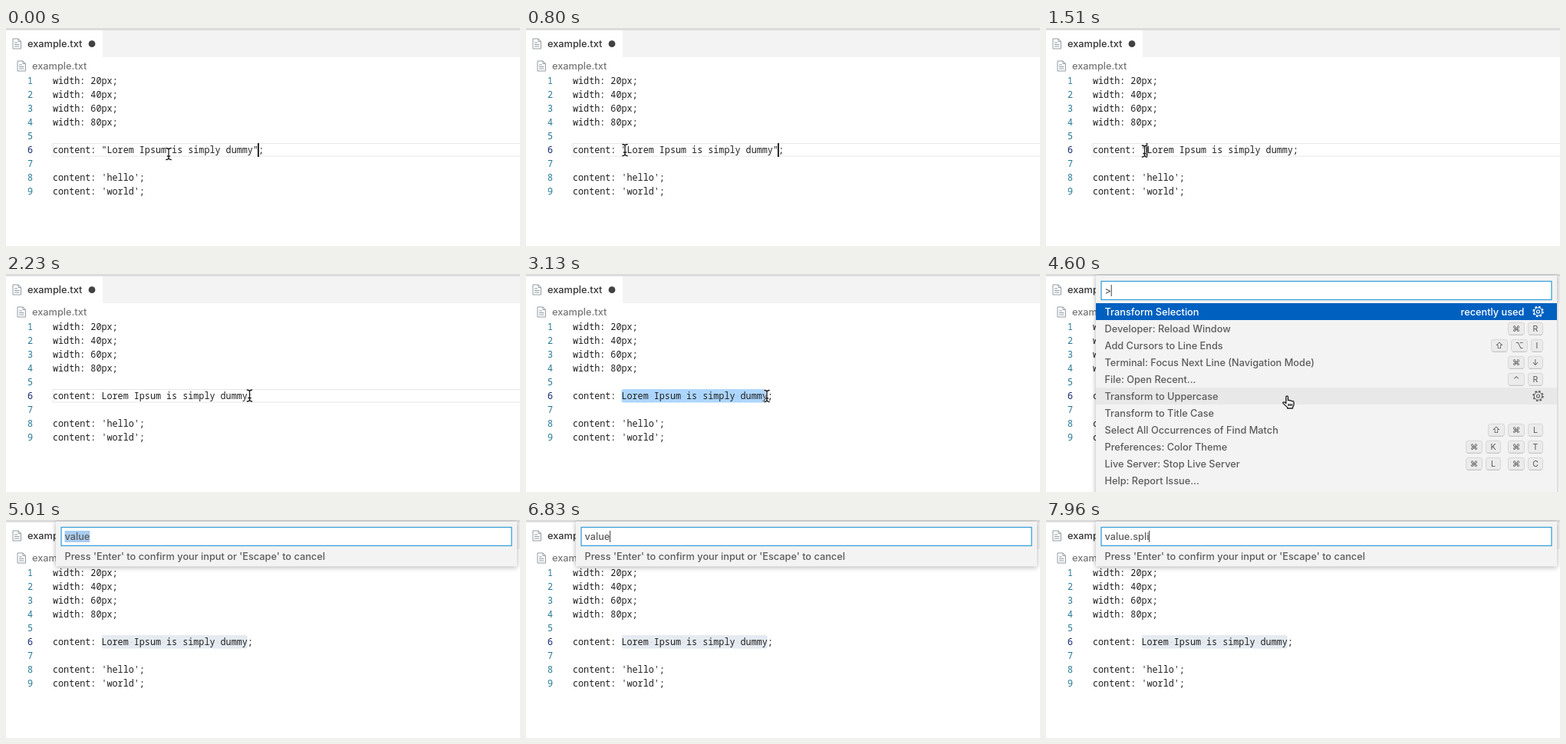
Recreate the animation shown at these times as an HTML page. Size 670 by 284 pixels, loop 8000 ms.

```html
<!DOCTYPE html>
<html lang="en">
<head>
<meta charset="utf-8">
<title>Editor</title>
<style>
  html, body { margin: 0; width: 100%; height: 100%; overflow: hidden; background: #fff; }
  svg { display: block; }
  text { white-space: pre; }
  .ui { font: 450 12.75px Inter, sans-serif; fill: #5c5c5c; }
  .code { font: 11.75px "Noto Sans Mono", monospace; fill: #1f1f1f; }
  .key { font: 10.5px Inter, "DejaVu Sans", sans-serif; fill: #555; text-anchor: middle; }
  .num { text-anchor: end; fill: #237893; }
  .panel { filter: drop-shadow(0 1px 3px rgba(0, 0, 0, .32)); }
</style>
</head>
<body>
<svg id="stage" width="670" height="284" viewBox="0 0 670 284"></svg>
<script>
const LOOP = 8000, CH = 7.05, LEFT = 61, ROW = 18;
const stage = document.getElementById('stage');

function el(parent, tag, attrs = {}, content) {
  const node = document.createElementNS('http://www.w3.org/2000/svg', tag);
  for (const k in attrs) node.setAttribute(k, attrs[k]);
  if (content !== undefined) node.textContent = content;
  return parent.appendChild(node);
}
const group = (parent, attrs) => el(parent, 'g', attrs);
const rect = (parent, x, y, width, height, fill, more) =>
  el(parent, 'rect', { x, y, width, height, fill, ...more });
const label = (parent, x, y, s, cls = 'ui', more) =>
  el(parent, 'text', { x, y, class: cls, ...more }, s);
const show = (node, on) => node.setAttribute('visibility', on ? 'visible' : 'hidden');
const col = n => LEFT + n * CH;

function fileIcon(x, y) {
  const g = group(stage, { transform: `translate(${x} ${y})`, fill: 'none', stroke: '#929ba2' });
  el(g, 'path', { d: 'M.5 .5H7.5L11 4V13.5H.5Z M7.5 .5V4H11' });
  el(g, 'path', { d: 'M2.5 5.5H6.5M2.5 8H9M2.5 10.5H9' });
}

function gear(parent, x, y, color) {
  const g = group(parent, { transform: `translate(${x} ${y})`, fill: 'none', stroke: color });
  el(g, 'circle', { r: 6.3, 'stroke-width': 1.8, 'stroke-dasharray': '2.47 2.47' });
  el(g, 'circle', { r: 5.2, 'stroke-width': 1 });
  el(g, 'circle', { r: 2, 'stroke-width': 1.1 });
}

// Editor chrome
rect(stage, 0, 0, 670, 3, '#dcdcdc');
rect(stage, 126, 3, 544, 35, '#f3f3f3');
fileIcon(8.5, 13.5);
label(stage, 28, 25.2, 'example.txt', 'ui', { style: 'fill:#333' });
el(stage, 'circle', { cx: 112, cy: 20.7, r: 4.4, fill: '#424242' });
fileIcon(14.5, 42.5);
label(stage, 34, 54, 'example.txt', 'ui', { style: 'fill:#777' });

// Code
const rowLine = group(stage);
rect(rowLine, LEFT, 150.5, 620, 16.5, 'none', { stroke: '#e6e6e6' });
const mark = rect(stage, col(9), 150, 27 * CH, 17.5, '#add6ff', { rx: 3 });
const dots = group(stage);
for (const n of [5, 11, 14, 21])
  el(dots, 'circle', { cx: col(9.5 + n), cy: 159.5, r: .7, fill: '#33333330' });

const lines = ['width: 20px;', 'width: 40px;', 'width: 60px;', 'width: 80px;', '', '', '',
  "content: 'hello';", "content: 'world';"];
const code = lines.map((s, i) => {
  const y = 73 + i * ROW;
  label(stage, 35, y, i + 1, 'code num', i === 5 ? { style: 'fill:#0b216f' } : {});
  return label(stage, LEFT, y, s, 'code');
});
const caret = rect(stage, 0, 150, 2, 18, '#222');

// Command list
const list = group(stage);
rect(list, 65, 2, 601, 290, '#f3f3f3', { class: 'panel' });
rect(list, 65, 38, 601, 22, '#0060c0');
rect(list, 65, 148, 601, 22, '#e8e8e8');
const commands = [
  ['Transform Selection'],
  ['Developer: Reload Window', '⌘R'],
  ['Add Cursors to Line Ends', '⇧⌥I'],
  ['Terminal: Focus Next Line (Navigation Mode)', '⌘↓'],
  ['File: Open Recent...', '⌃R'],
  ['Transform to Uppercase'],
  ['Transform to Title Case'],
  ['Select All Occurrences of Find Match', '⇧⌘L'],
  ['Preferences: Color Theme', '⌘K ⌘T'],
  ['Live Server: Stop Live Server', '⌘L ⌘C'],
  ['Help: Report Issue...'],
];

function keys(s, y) {
  let right = 648;
  for (const k of [...s].reverse()) {
    if (k === ' ') { right -= 5; continue; }
    const w = k === 'I' ? 16 : '⌘⇧⌥⌃'.includes(k) ? 22 : 20;
    rect(list, right - w + .5, y - 8, w - 1, 16, '#ebebeb', { rx: 3, stroke: '#d6d6d6' });
    rect(list, right - w + 2, y + 7.5, w - 4, 1, '#c2c2c2');
    label(list, right - w / 2, y + 3.8, k, 'key');
    right -= w + 4;
  }
}
commands.forEach(([name, combo], i) => {
  const y = 49.3 + i * 22;
  label(list, 76.5, y + 4.4, name, 'ui', i ? {} : { style: 'fill:#fff' });
  if (combo) keys(combo, y);
});
label(list, 623.5, 53.7, 'recently used', 'ui', { style: 'fill:#fff;text-anchor:end' });
gear(list, 641.5, 49, '#fff');
gear(list, 641.5, 159, '#616161');

// Prompt
const ask = group(stage);
rect(ask, 65, 2, 601, 58.5, '#f3f3f3', { class: 'panel' });
label(ask, 76.5, 52, "Press 'Enter' to confirm your input or 'Escape' to cancel");

// Shared input field
const field = group(stage);
rect(field, 72, 9.5, 587, 24, '#fff', { stroke: '#3aa0d8', 'stroke-width': 1.3 });
const picked = rect(field, 76.5, 14, 31, 15, '#a9cdf2');
const typed = label(field, 76.5, 26, '');
const bar = rect(field, 0, 14, 1, 15, '#444');

// Mouse pointers
const beam = group(stage, { fill: 'none', 'stroke-linecap': 'round' });
const beamPath = 'M-3.2 -7.5Q0 -7.5 0 -5V5Q0 7.5 -3.2 7.5M3.2 -7.5Q0 -7.5 0 -5V5Q0 7.5 3.2 7.5M-1.7 3H1.7';
el(beam, 'path', { d: beamPath, stroke: '#fff', 'stroke-width': 2.8, opacity: .75 });
el(beam, 'path', { d: beamPath, stroke: '#1c1c1c', 'stroke-width': 1.3 });
const hand = el(stage, 'path', {
  transform: 'translate(307.5 158) scale(1.08 1)', fill: '#fff', stroke: '#222', 'stroke-width': 1.3,
  'stroke-linejoin': 'round',
  d: 'M5 11V2.4Q5 .8 6.2 .8T7.4 2.4V6.8Q8.6 5.6 9.8 7.2Q11.2 6.2 12.2 7.8Q14.4 7 14.4 9.6V12' +
     'Q14.4 14 13 15.5V17H6.6V15.6L1.6 10.6Q.8 9 2.4 8.8Q3.4 8.8 5 10.6M8 11V14M10 11V14M12 11V14',
});

// [time, ...values], the last entry reached is in force
const TEXT = [
  [0, 'content: "Lorem Ipsum is simply dummy";'],
  [950, 'content: "Lorem Ipsum is simply dummy;'],
  [1590, 'content: Lorem Ipsum is simply dummy;'],
];
const CARET = [ // column, -1 when off
  [0, 38], [250, -1], [720, 38], [950, 37], [1190, 10], [1590, 9],
  [2090, -1], [2470, 36], [3130, -1],
];
const INPUT = [ // text, caret on
  [0, '>', 1], [4110, '>', 0], [4600, '>', 1], [5010, 'value', 0], [6830, 'value', 1],
  [7240, 'value', 0], [7310, 'value.', 1], [7560, 'value.s', 1], [7640, 'value.sp', 1],
  [7800, 'value.spl', 1], [7960, 'value.spli', 1],
];
const MOUSE = [ // x, y
  [0, 212, 164], [240, 198, 166], [560, 150, 162], [800, 129, 159], [1360, 129, 159],
  [1520, 128, 162], [1680, 129, 160], [1840, 129, 160], [2160, 317.5, 158.5],
  [2720, 317.5, 158.5], [2800, 314, 159],
];
const at = (table, t) => table.findLast(step => step[0] <= t);

function mouseAt(t) {
  const q = Math.floor(t / 80) * 80;
  const a = at(MOUSE, q), b = MOUSE[MOUSE.indexOf(a) + 1];
  if (!b) return a.slice(1);
  const k = (q - a[0]) / (b[0] - a[0]);
  return [1, 2].map(i => a[i] + (b[i] - a[i]) * k);
}

function draw(t) {
  const listOn = t >= 3620 && t < 5010, askOn = t >= 5010, selected = t >= 2550;
  code[5].textContent = at(TEXT, t)[1];
  show(rowLine, !selected);
  show(mark, selected);
  show(dots, selected);
  mark.setAttribute('fill', t >= 3620 ? '#e5ebf1' : '#add6ff');

  const c = at(CARET, t)[1];
  show(caret, c >= 0);
  caret.setAttribute('x', col(c) - 1);

  show(list, listOn);
  show(ask, askOn);
  show(field, listOn || askOn);
  const [, s, on] = at(INPUT, t);
  typed.textContent = s;
  const w = typed.getComputedTextLength();
  const whole = askOn && t < 6830;
  show(picked, whole);
  if (whole) picked.setAttribute('width', w);
  show(bar, on && (listOn || askOn));
  bar.setAttribute('x', 76.5 + w - .3);

  show(beam, t < 3620);
  show(hand, listOn);
  beam.setAttribute('transform', `translate(${mouseAt(t)})`);
}

const start = performance.now();
function tick() {
  draw((performance.now() - start) % LOOP);
  requestAnimationFrame(tick);
}
tick();
</script>
</body>
</html>
```
